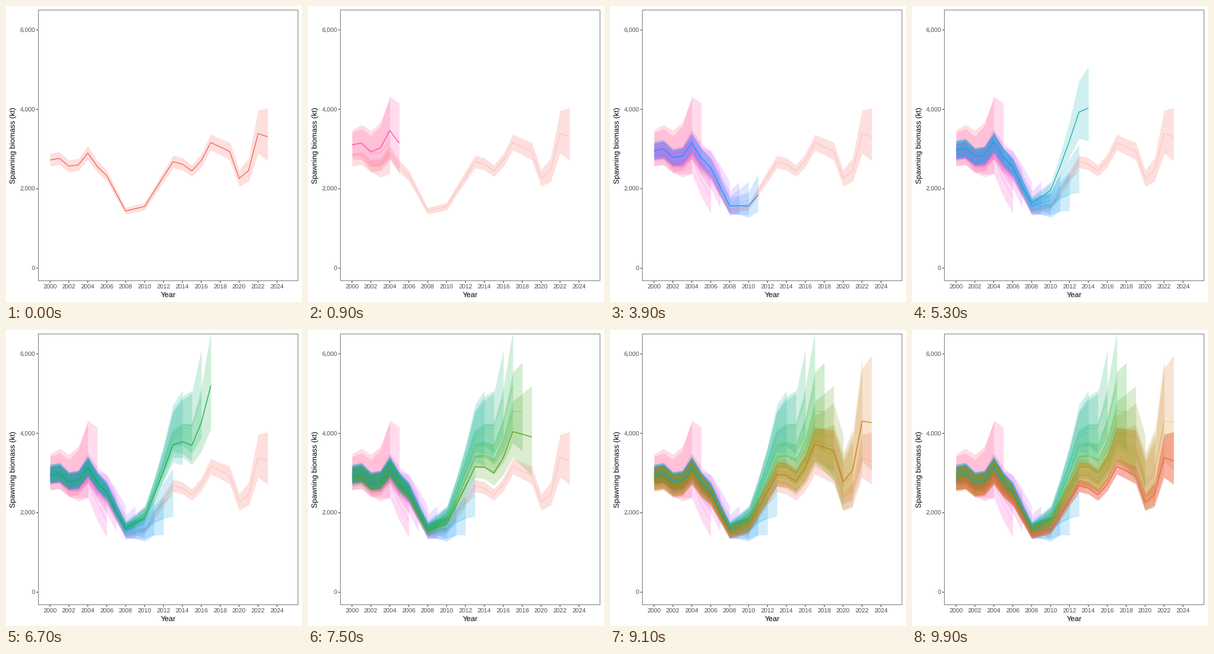
A matplotlib script for the animation above (10000 ms loop, 480x480 px).

```python
import math

import matplotlib.pyplot as plt
import numpy as np
from matplotlib.animation import FuncAnimation

SIZE, DPI = 480, 80
PT = 72 / DPI  # points per pixel
LEFT, RIGHT, TOP, BOTTOM = 52.5, 473.5, 6.5, 445.5
PAST_ALPHA = 0.2
FIRST, LAST_DATA = 2000, 2023
OLDEST, LATEST = 2004, 2025  # assessments

plt.rcParams["font.family"] = "Liberation Sans"
plt.rcParams["text.hinting"] = "none"
plt.rcParams["path.snap"] = False

# Turning points of the latest median, by year
MEDIAN = {2000: 2725, 2001: 2765, 2002: 2570, 2003: 2600, 2004: 2900,
          2005: 2560, 2006: 2330, 2008: 1440, 2010: 1555, 2013: 2680,
          2014: 2620, 2015: 2450, 2016: 2710, 2017: 3165, 2019: 2940,
          2020: 2260, 2021: 2460, 2022: 3390, 2023: 3310}

# Ratio to the latest median in the early and in the final years,
# and scale of the interval, by assessment
EARLY = {2005: 1.14, 2006: 1.03, 2007: 1.07, 2014: 1.10, 2023: 1.03, 2024: 1}
FINAL = {2004: 1.10, 2005: 1.23, 2006: 0.77, 2007: 1.03, 2008: 1.20,
         2010: 1.10, 2012: 0.81, 2013: 0.91, 2014: 1.54, 2016: 1.80,
         2019: 1.33, 2021: 1.20, 2023: 1.29, 2024: 1}
SPREAD = {2004: 1.55, 2008: 1.15, 2012: 1.35, 2015: 1.10,
          2018: 1.25, 2020: 1.75, 2023: 1.80, 2024: 1}

STEPS = [LATEST, *range(OLDEST, LATEST + 1)]
STARTS = [0, *range(4, 50, 5), 53, 58, 63, *range(67, 100, 4)]


def px(year):
    return 71.3 + (year - FIRST) * 15.34


def py(value):
    return 425.2 - value * 0.0644


def between(keys, at):
    return np.interp(at, list(keys), list(keys.values()))


def hue_color(hue, chroma=100, light=65):
    """Polar LUV colour, slightly deepened."""
    angle = math.radians(hue)
    u = chroma * math.cos(angle) / (13 * light) + 0.1978
    v = chroma * math.sin(angle) / (13 * light) + 0.4683
    y = ((light + 16) / 116) ** 3
    x = 9 * y * u / (4 * v)
    z = -x / 3 - 5 * y + 3 * y / v
    matrix = np.array([[3.2406, -1.5372, -0.4986],
                       [-0.9689, 1.8758, 0.0415],
                       [0.0557, -0.2040, 1.0570]])
    linear = np.clip(matrix @ [x, y, z], 0, 1)
    srgb = np.where(linear > 0.0031308,
                    1.055 * linear ** (1 / 2.4) - 0.055, 12.92 * linear)
    return np.clip(srgb ** 1.25, 0.08, 1)


def assessment(edition):
    """Years, median and interval factor of one assessment."""
    last = min(edition, LAST_DATA)
    years = np.arange(FIRST, last + 1)
    # recent editions revise the whole recovery, older ones a few years
    start = 2007 if edition >= 2014 else last - 3
    ramp = np.clip((years - start) / (last - start), 0, 1) ** 1.2
    early, final = between(EARLY, edition), between(FINAL, edition)
    median = between(MEDIAN, years) * (early + (final - early) * ramp)
    width = 0.06 + 0.16 * np.exp(-0.36 * (last - years) ** 1.3)
    return years, median, 1 + between(SPREAD, edition) * width


fig = plt.figure(figsize=(SIZE / DPI, SIZE / DPI), dpi=DPI, facecolor="white")
ax = fig.add_axes([0, 0, 1, 1])
ax.set(xlim=(0, SIZE), ylim=(SIZE, 0))
ax.axis("off")


def add_series(edition):
    years, median, factor = assessment(edition)
    color = hue_color(15 + (LATEST - edition) * 360 / (LATEST - OLDEST + 1))
    ribbon = ax.fill_between(px(years), py(median / factor), py(median * factor),
                             color=color, alpha=PAST_ALPHA, lw=0, zorder=1)
    line, = ax.plot(px(years), py(median), color=color, lw=1.3 * PT,
                    solid_joinstyle="round", solid_capstyle="butt", zorder=2)
    return ribbon, line


def draw_axes():
    ax.plot([LEFT, RIGHT, RIGHT, LEFT, LEFT], [TOP, TOP, BOTTOM, BOTTOM, TOP],
            color="#7f7f7f", lw=PT, solid_joinstyle="miter", zorder=3)
    tick = dict(color="#333333", lw=PT, solid_capstyle="butt", zorder=3)
    label = dict(color="#4d4d4d", size=10 * PT, va="baseline")
    title = dict(color="black", size=12.3 * PT, ha="center", va="baseline")
    for year in range(FIRST, LATEST, 2):
        ax.plot([px(year)] * 2, [446, 449], **tick)
        ax.text(px(year), 458.6, str(year), ha="center", **label)
    for value in range(0, 6001, 2000):
        ax.plot([49, 52], [py(value)] * 2, **tick)
        ax.text(47.3, py(value) + 3.7, f"{value:,}", ha="right", **label)
    ax.text(263, 472, "Year", **title)
    ax.text(16, 226, "Spawning biomass (kt)", rotation=90,
            rotation_mode="anchor", **title)


series = [add_series(edition) for edition in STEPS]
draw_axes()


def update(frame):
    current = np.searchsorted(STARTS, frame, side="right") - 1
    for i, (ribbon, line) in enumerate(series):
        ribbon.set_visible(i <= current)
        line.set_visible(i <= current)
        line.set_alpha(1 if i == current else PAST_ALPHA)
    return [artist for pair in series for artist in pair]


anim = FuncAnimation(fig, update, frames=100, interval=100,
                     repeat=True, repeat_delay=0, blit=False)
plt.show()
```
